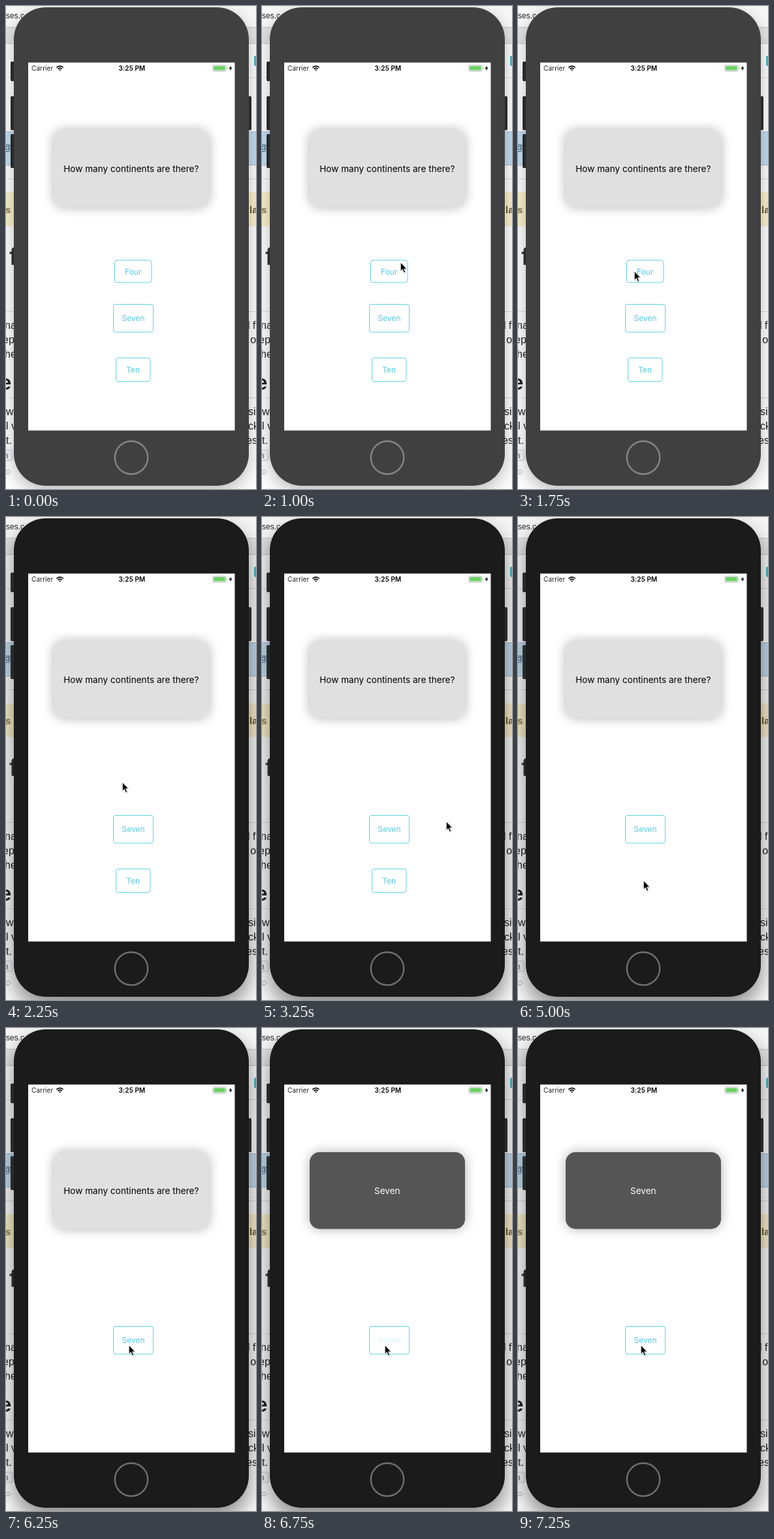
An HTML page for the animation above (8000 ms loop, 383 by 739 pixels).

```html
<!DOCTYPE html>
<html lang="en">
<head>
<meta charset="utf-8">
<title>Quiz on a phone</title>
<style>
  html, body { margin: 0; width: 100%; height: 100%; overflow: hidden; background: #fff; }
  svg { display: block; width: 383px; height: 739px; }
  text { white-space: pre; }
  .ui { font-family: Inter, Roboto, sans-serif; }
  .page { font-family: "Liberation Sans", Arial, sans-serif; font-size: 16px; fill: #222; }
  .mid { text-anchor: middle; }
  .bold { font-weight: 700; }
  .answer rect { fill: none; stroke: #5fd3e2; }
  .answer text { fill: #54cade; font-size: 12px; }
</style>
</head>
<body>
<svg viewBox="0 0 383 739" xmlns="http://www.w3.org/2000/svg">
  <defs>
    <filter id="wide" x="-30%" y="-30%" width="160%" height="160%"><feGaussianBlur stdDeviation="17"/></filter>
    <filter id="tight" x="-30%" y="-30%" width="160%" height="160%"><feGaussianBlur stdDeviation="12"/></filter>
    <filter id="glow" x="-30%" y="-40%" width="160%" height="180%"><feGaussianBlur stdDeviation="9"/></filter>
    <filter id="soft" x="-50%" y="-50%" width="200%" height="200%"><feGaussianBlur stdDeviation="1"/></filter>
  </defs>

  <g id="page" class="page">
    <rect width="383" height="739" fill="#fcfcfd"/>
    <rect width="383" height="32" fill="#f6f6f6"/>
    <rect y="32" width="383" height="25" fill="#e2e2e2"/>
    <path d="M0 32.5H383M0 57.5H383" stroke="#c4c4c4"/>
    <path d="M0 109.5H383M0 264.5H383M0 467.5H383M0 599.5H383" stroke="#d8d8da"/>
    <rect x="380" y="76" width="8" height="16" rx="3" fill="#43bcc8"/>
    <rect x="-1" y="192.5" width="385" height="51" fill="#c2dcf0" stroke="#9dbdd6"/>
    <rect y="285" width="383" height="52" fill="#f8f0cb"/>
    <rect x="-6" y="679.5" width="16" height="16" rx="3" fill="#f4f4f6" stroke="#c8c8cc"/>
    <path d="M-3 711H3V709L7 713L3 717V715H-3Z" fill="none" stroke="#aaa"/>
  </g>

  <rect id="shadowOff" x="12" y="10" width="360" height="732" rx="50" filter="url(#tight)" opacity=".26"/>
  <rect id="shadowOn" x="12" y="18" width="360" height="732" rx="50" filter="url(#wide)" opacity=".48"/>

  <g fill="#292929">
    <rect x="7" y="85" width="10" height="30" rx="2"/>
    <rect x="7" y="138" width="10" height="52" rx="2"/>
    <rect x="7" y="196" width="10" height="52" rx="2"/>
    <rect x="366" y="138" width="10" height="52" rx="2"/>
  </g>
  <rect id="body" x="12" y="2" width="360" height="732" rx="49"/>
  <circle id="home" cx="192" cy="691" r="25.2" fill="none" stroke-width="2.4"/>
  <rect x="34" y="86.5" width="316.5" height="563" fill="#fff"/>

  <g class="ui" font-size="10">
    <text x="39" y="99" letter-spacing=".1" fill="#222">Carrier</text>
    <text x="193" y="99" class="mid" font-weight="600" letter-spacing=".1">3:25 PM</text>
    <g fill="none" stroke="#000" stroke-width="1.7">
      <path d="M77.3 94.2Q82.5 89.4 87.7 94.2M79.4 96.4Q82.5 93.5 85.6 96.4"/>
    </g>
    <path d="M80.9 97.6Q82.5 96.3 84.1 97.6L82.5 99.3Z"/>
    <rect x="317" y="90.8" width="20" height="8.8" rx="2" fill="#fff" stroke="#999" stroke-width=".8"/>
    <rect x="318.3" y="92.1" width="17.4" height="6.2" rx="1" fill="#6cd264"/>
    <path d="M338.2 93.7Q339.8 95.2 338.2 96.7Z" fill="#999"/>
    <path d="M345 91.2L341.4 95.8H343.7L343 99.2L346.7 94.5H344.3Z"/>
  </g>

  <rect x="73" y="190" width="238" height="117.5" rx="16" filter="url(#glow)" opacity=".3"/>
  <rect id="card" x="73" y="190" width="238" height="117.5" rx="15"/>
  <text id="cardText" class="ui mid" x="191.8" y="254" font-size="13.6"></text>

  <g id="answers" class="ui mid"></g>

  <g id="cursor">
    <path d="M0 1V14.5L3.2 11.7L5.6 17L8 16L5.7 11H10Z" opacity=".35" filter="url(#soft)"/>
    <path d="M.3 .3V13.8L3.3 11L5.5 16.2L7.8 15.2L5.6 10.2H9.8Z" stroke="#fff" stroke-width=".9"/>
  </g>
</svg>
<script>
const LOOP = 8000;
const $ = id => document.getElementById(id);

function add(parent, tag, attrs, text = "") {
  const node = document.createElementNS("http://www.w3.org/2000/svg", tag);
  for (const key in attrs) node.setAttribute(key, attrs[key]);
  node.textContent = text;
  return parent.appendChild(node);
}

// Edges of the web page that show beside the phone: text, x, baseline, style
[
  ["ses.c", 0, 19, { style: "font-size:12px" }],
  ["@", -4, 221, { style: "font-size:13px;fill:#29506f", class: "bold" }],
  ["s (", -1, 317, { style: "font-size:15px;fill:#8a7240", class: "bold" }],
  ["la", 373, 317, { style: "font-size:15px;fill:#6b5830", class: "bold" }],
  ["f", 5, 396, { style: "font-size:37px;fill:#333", class: "bold" }],
  ["nai", -2, 494], ["l fo", 370, 494],
  ["ept", -5, 516], ["d o", 361, 516],
  ["he", -2, 538],
  ["e", -9, 587, { style: "font-size:31px", class: "bold" }],
  ["w", 0, 626], ["sin", 371, 626],
  ["l v", 0, 648], ["ck", 371, 648],
  ["t. ", 0, 670], ["es", 368, 670],
  ["n", -4, 692, { style: "font:13px 'Liberation Mono',monospace;fill:#555" }],
].forEach(([text, x, y, style]) => add($("page"), "text", { x, y, ...style }, text));

function answer(label, x, y, width, height) {
  const group = add($("answers"), "g", { class: "answer" });
  add(group, "rect", { x, y, width, height, rx: 3.5 });
  const text = add(group, "text", { x: x + width / 2, y: y + height / 2 + 4.5 }, label);
  return { group, text };
}
const four = answer("Four", 166.5, 389, 56.5, 34);
const seven = answer("Seven", 164.5, 456.5, 61, 42.5);
const ten = answer("Ten", 168.5, 538.5, 52.5, 36);

const cursorPath = [
  [500, 302, 344], [750, 248, 374], [1000, 212, 392], [1250, 187, 403],
  [1500, 178, 405.5], [2750, 184, 405.5], [3000, 272, 436], [3250, 282, 465.5],
  [3500, 256, 544], [3750, 210, 563], [4000, 193, 557], [4250, 192, 556],
  [5750, 191, 502], [6000, 188, 485],
];
const sevenFade = [[0, 1], [6750, .2], [7000, .6], [7250, 1]];
const latest = (steps, t) => steps.findLast(step => step[0] <= t);
const show = (node, on) => node.setAttribute("visibility", on ? "visible" : "hidden");

function draw(t) {
  const active = t >= 2250, flipped = t >= 6750;
  show($("shadowOff"), !active);
  show($("shadowOn"), active);
  $("body").setAttribute("fill", active ? "#1b1b1b" : "#404040");
  $("home").setAttribute("stroke", active ? "#6f6f6f" : "#858585");

  $("card").setAttribute("fill", flipped ? "#555" : "#e0e0e0");
  $("cardText").setAttribute("fill", flipped ? "#fff" : "#000");
  $("cardText").textContent = flipped ? "Seven" : "How many continents are there?";

  show(four.group, t < 2250);
  show(ten.group, t < 5000);
  ten.text.setAttribute("opacity", t < 4750 ? 1 : .2);
  seven.text.setAttribute("opacity", latest(sevenFade, t)[1]);

  const point = latest(cursorPath, t);
  show($("cursor"), point);
  if (point) $("cursor").setAttribute("transform", `translate(${point[1]} ${point[2]})`);
}

const start = performance.now();
function tick() {
  draw((performance.now() - start) % LOOP);
  requestAnimationFrame(tick);
}
tick();
</script>
</body>
</html>
```
